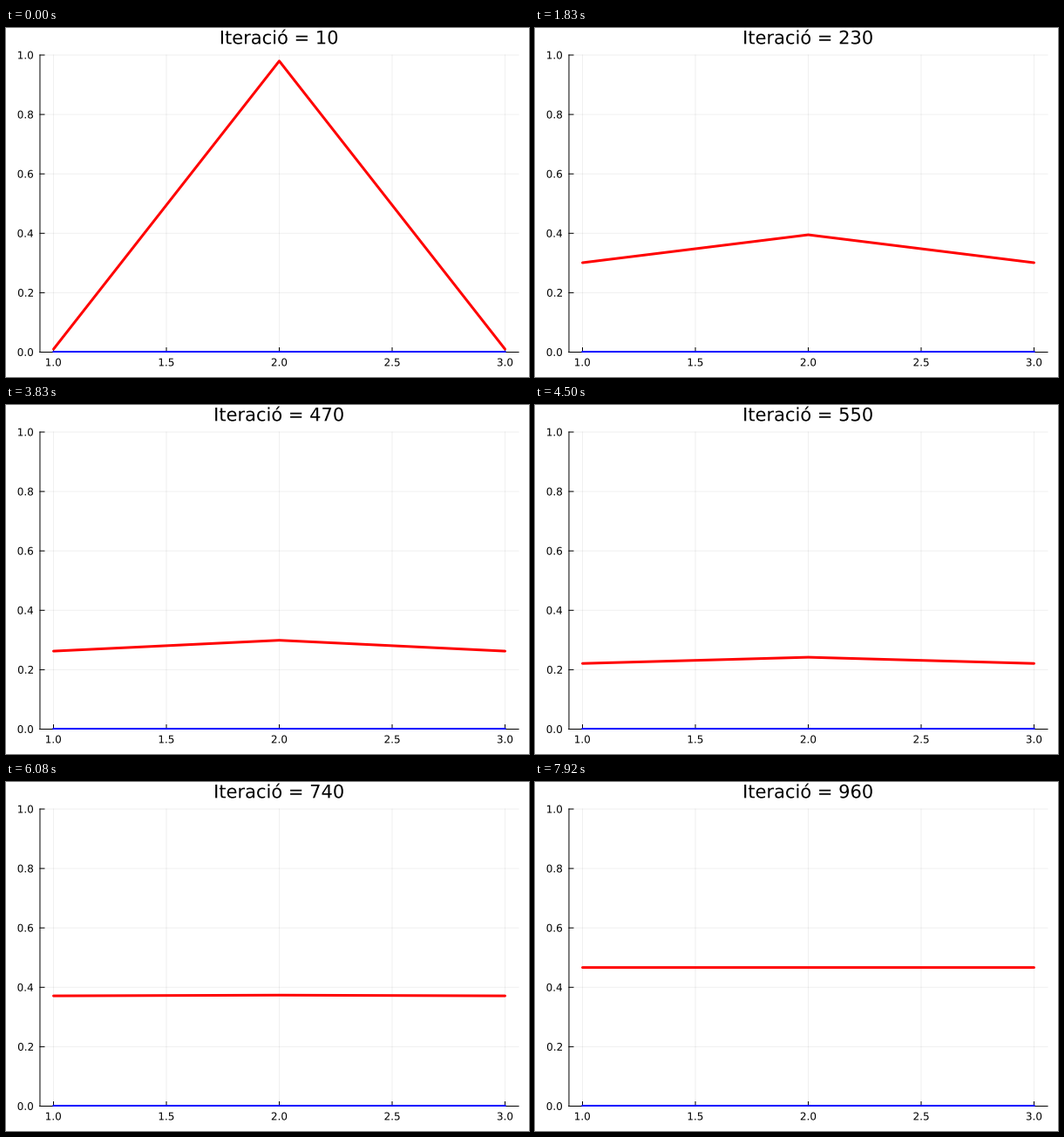
These frames come from a looping animation (600 px wide and 400 px high, 8000 ms). A matplotlib script:

```python
import numpy as np
import matplotlib.pyplot as plt
from matplotlib.animation import FuncAnimation
from matplotlib.patches import PathPatch
from matplotlib.path import Path
from matplotlib.textpath import TextPath

W, H, DPI = 600, 400, 100
PX = 72 / DPI                       # points per pixel
LOOP, STEPS, TICK = 8000, 96, 20    # ms, iterations shown, ms per redraw

plt.rcParams["font.family"] = "DejaVu Sans"


def to_x(v):
    return 313.5 + 259 * (np.asarray(v) - 2)


def to_y(v):
    return 371.5 - 340.5 * np.asarray(v)


LEFT, RIGHT = to_x([0.94, 3.06])
BOTTOM, TOP = to_y([0, 1])


def levels(t):
    """Values at the three nodes: the peak flattens while the mean dips, then grows."""
    dip = 0.143 / (1 + np.exp((489 - t) / 52))
    growth = 0.286 * np.exp(-np.exp((674 - t) / 85))
    mean = 1 / 3 - dip + growth
    age = t - 10
    decay = 2.385 * (1 - np.exp(-(age / 106) ** 1.4)) + (age / 477) ** 3
    gap = 0.97 * np.exp(-decay)
    end = mean - gap / 3
    return [end, end + gap, end]


fig = plt.figure(figsize=(W / DPI, H / DPI), dpi=DPI, facecolor="white")
ax = fig.add_axes([0, 0, 1, 1])
ax.set_xlim(0, W)
ax.set_ylim(H, 0)
ax.axis("off")


def stroke(xs, ys, color="black", width=1.0, **kw):
    return ax.plot(xs, ys, color=color, lw=width * PX, snap=False, **kw)[0]


def outline(x, y, text, size, align=0.5):
    """Text outline with baseline y; align 0.5 centres on x, 1 ends at x."""
    path = TextPath((0, 0), text, size=size)
    box = path.get_extents()
    shift = [x - box.x0 - align * box.width, y]
    return Path(path.vertices * [1, -1] + shift, path.codes)


def label(*args):
    patch = PathPatch(outline(*args), fc="black", lw=0, snap=False)
    return ax.add_patch(patch)


for v in np.arange(1, 3.1, 0.5):
    x = to_x(v)
    stroke([x, x], [TOP, BOTTOM], alpha=0.06)
    stroke([x, x], [BOTTOM, BOTTOM - 5], zorder=3)
    label(x, 387.4, f"{v:.1f}", 12)

for v in np.arange(0, 1.1, 0.2):
    y = to_y(v)
    stroke([LEFT, RIGHT], [y, y], alpha=0.06)
    stroke([LEFT, LEFT + 5], [y, y], zorder=3)
    label(31, y + 4.4, f"{v:.1f}", 12, 1)

stroke([LEFT, LEFT], [TOP, BOTTOM], zorder=3)
stroke([LEFT, RIGHT], [BOTTOM, BOTTOM], zorder=3)

# the lower half of the zero line is cut off at the axis
stroke(to_x([1, 3]), [BOTTOM - 0.5] * 2, "blue", 2, zorder=4)
red = stroke(to_x([1, 2, 3]), to_y(levels(10)), "red", 3, zorder=5,
             solid_capstyle="round", solid_joinstyle="round")
title = label(313.5, 18.3, "Iteració = 10", 21)


def update(i):
    # look slightly ahead so that no change comes late
    now = i * TICK + TICK - 3
    step = 10 * (now * STEPS // LOOP + 1)
    red.set_ydata(to_y(levels(step)))
    title.set_path(outline(313.5, 18.3, f"Iteració = {step}", 21))
    return red, title


anim = FuncAnimation(fig, update, frames=LOOP // TICK, interval=TICK,
                     repeat=True, repeat_delay=0, blit=False)
plt.show()
```
